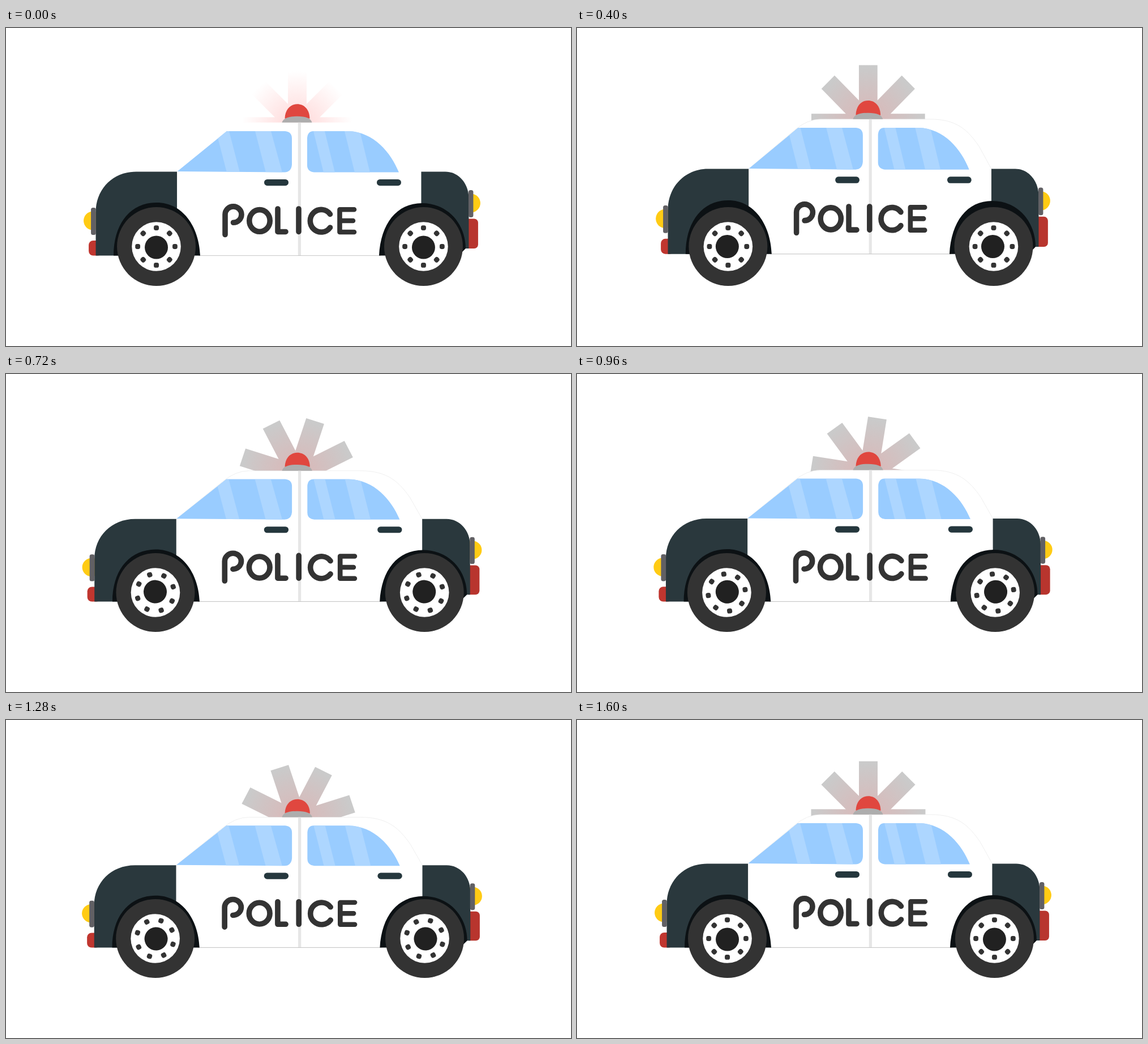
Animation, 998 px wide and 561 px high, one loop 1680 ms. Source, as an HTML page:

```html
<!DOCTYPE html>
<html lang="en">
<head>
<meta charset="utf-8">
<title>Police car</title>
<style>
html, body { margin: 0; width: 100%; height: 100%; overflow: hidden; background: #fff; }
svg { display: block; width: 100%; height: 100%; }
</style>
</head>
<body>
<svg viewBox="0 0 998 561">
  <defs>
    <radialGradient id="glow" gradientUnits="userSpaceOnUse" cx="0" cy="0" r="102">
      <stop offset=".3" stop-color="#d6bcbc"/><stop offset=".95" stop-color="#cacaca"/>
    </radialGradient>
    <radialGradient id="faint" gradientUnits="userSpaceOnUse" cx="0" cy="0" r="102">
      <stop offset=".3" stop-color="#ffe2e2"/><stop offset=".96" stop-color="#fff"/>
    </radialGradient>
    <path id="glass" d="M302.5 253 390 182H493Q505 183 505 195V241Q504 254 492 254.5ZM543 182H604C650 183 680 220 694 254.5H544Q532 253 532 242V194Q533 182 543 182Z"/>
    <clipPath id="panes"><use href="#glass"/></clipPath>
    <g id="wheel">
      <circle r="69.5" fill="#333"/>
      <circle r="43.3" fill="#fff"/>
      <g class="spin"><circle cy="1.5" r="20.5" fill="#212121"/></g>
    </g>
  </defs>

  <g id="car">
    <g id="beams" transform="translate(514.5 174)"><g id="rays"></g></g>
    <path id="shell" fill="#fff" stroke-width=".6" d="M302 253.5 384 186Q406 167 430 167H625C672 167 692 186 712 215L733.5 253.5V401H302Z"/>
    <path fill="#e0473f" d="M492.5 160C493 143 503 134.5 514.5 134.5S536 143 536.5 160Z"/>
    <path fill="#adadad" d="M487.5 167Q490 156 514 156T540.5 167Z"/>
    <path fill="#e6e6e6" d="M515.8 167H521V401.5H515.8Z"/>
    <path stroke="#bbb" stroke-width=".8" d="M340 401.5H662"/>

    <circle cx="153.5" cy="340" r="16.5" fill="#ffcb14"/>
    <circle cx="821.5" cy="309" r="16.5" fill="#ffcb14"/>
    <rect x="146" y="375" width="24" height="26.5" rx="8" fill="#c0362f"/>
    <rect x="808" y="336.5" width="26" height="52.5" rx="7" fill="#b8352e"/>
    <path fill="#2a383d" d="M158.5 401.5V325C158.5 285 188 253.5 230 253.5H302V401.5ZM733.5 253.5H776C800 253.5 817.5 275 817.5 300V389H733.5Z"/>
    <rect x="150" y="317" width="8.7" height="48" rx="3.5" fill="#616064"/>
    <rect x="817" y="286" width="8.5" height="48" rx="3.5" fill="#616064"/>
    <path fill="#0c1114" d="M190 401.5C190 345 220 308 266 308S341 350 343 401.5ZM659 401.5C662 345 690 309 735 309S812 345 812 389L800 401Z"/>

    <use href="#glass" fill="#9cf"/>
    <path clip-path="url(#panes)" fill="#add6ff" d="M371 182h23l19 73h-23ZM440 182h28l20 73h-29ZM543 182h20l18 73h-20ZM598 182h27l18 73h-27Z"/>
    <rect x="456" y="267" width="43" height="11.3" rx="5.5" fill="#25373d"/>
    <rect x="655" y="267" width="43" height="11.3" rx="5.5" fill="#25373d"/>

    <g role="img" aria-label="POLICE" fill="none" stroke="#333" stroke-width="9.6" stroke-linecap="round" stroke-linejoin="round">
      <path d="M387 364.5V329A14.5 14.2 0 1 1 401.5 343.3"/>
      <ellipse cx="448" cy="340" rx="18.2" ry="19.3"/>
      <path d="M480 319V359.5H494M517 319V359.5"/>
      <path d="M572.5 328.5A19.5 19.8 0 1 0 572.5 352"/>
      <path stroke-width="8.6" d="M615 320.3H589.5V360H615M589.5 340H613"/>
    </g>
  </g>
  <g id="left"><use href="#wheel"/></g>
  <g id="right"><use href="#wheel"/></g>
</svg>
<script>
const STEP = 80, STEPS = 21, CYCLE = 20;
const $ = id => document.getElementById(id);
const place = (el, transform) => el.setAttribute('transform', transform);
const spin = document.querySelector('.spin');

for (let a = 0; a < 360; a += 45) {
  $('rays').innerHTML += `<rect x="-16.5" y="-101" width="33" height="101" transform="rotate(${a})"/>`;
  spin.innerHTML += `<rect x="-4.5" y="-37.3" width="9" height="8.8" rx="3.4" fill="#333" transform="rotate(${a})"/>`;
}

// Keys are [step, value], joined with sine ease-in-out.
const roofKeys = [[-1.55, 4.7], [3.15, -15], [7.1, 4.7], [11.3, 2.4], [15.3, 4.5], [18.45, 4.7], [23.15, -15]];
const liftKeys = [[0, 0], [3, -5.5], [7, 0], [20, 0]];

function ease(keys, n) {
  const i = Math.max(1, keys.findIndex(([step]) => step > n));
  const [[a, from], [b, to]] = [keys[i - 1], keys[i]];
  return from + (to - from) * (1 - Math.cos(Math.PI * (n - a) / (b - a))) / 2;
}

function draw(time) {
  const step = Math.floor(time / STEP) % STEPS, n = step % CYCLE;
  const lift = ease(liftKeys, n);
  const sy = 1 + (lift - ease(roofKeys, n)) / 234.5;
  const sx = 1 - 0.43 * (sy - 1);
  place($('car'), `translate(488 ${401.5 + lift}) scale(${sx} ${sy}) translate(-488 -401.5)`);
  place($('rays'), `rotate(${-18 * n})`);
  place(spin, `rotate(${18 * n})`);
  place($('left'), `translate(${488 - 222.5 * sx} 385.5)`);
  place($('right'), `translate(${488 + 249.5 * sx} 385.5)`);
  // The first step of each loop shows only a faint glow.
  $('beams').setAttribute('fill', step ? 'url(#glow)' : 'url(#faint)');
  $('shell').setAttribute('stroke', step ? '#e4e4e4' : 'none');
}

const start = performance.now();
(function tick() {
  draw(performance.now() - start);
  requestAnimationFrame(tick);
})();
</script>
</body>
</html>
```
